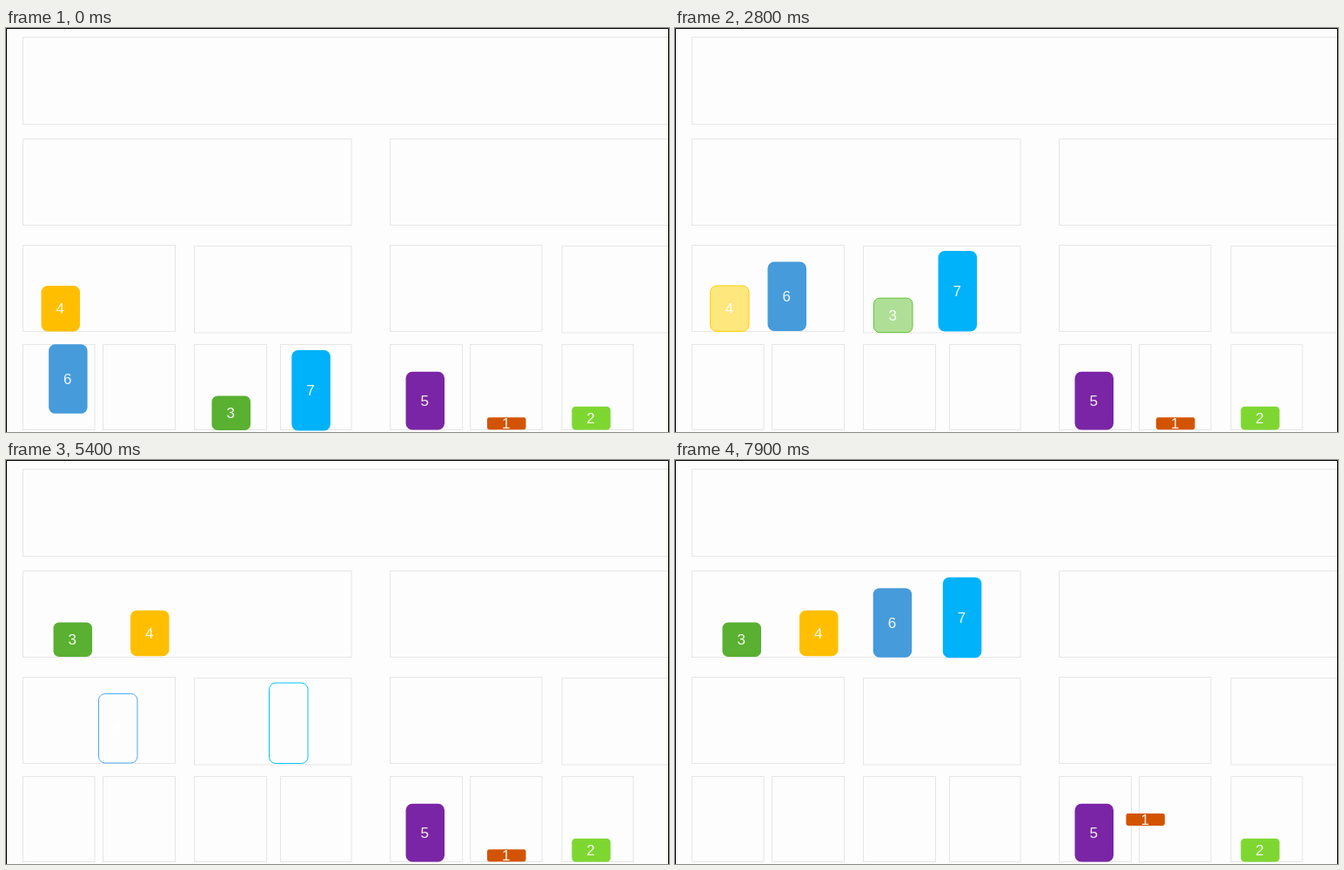
Recreate the animation shown at these times as an HTML page. Size 762 px wide and 464 px high, loop 8 s.

```html
<!DOCTYPE html>
<html lang="en">
<head>
<meta charset="utf-8">
<title>Merge sort</title>
<style>
  html, body { margin: 0; width: 100%; height: 100%; overflow: hidden; background: #fdfdfd; }
  svg { display: block; width: 762px; height: 464px; }
  text { font: 17px "Liberation Sans", Arial, sans-serif; fill: #fff; fill-opacity: .92; text-anchor: middle; }
</style>
</head>
<body>
<svg id="stage" viewBox="0 0 762 464">
  <rect width="762" height="464" fill="#fdfdfd"/>
  <g id="cells" fill="none" stroke="#e6e6e6"></g>
  <g id="blocks"></g>
  <path d="M.5 464V.5H761.5V464" fill="none" stroke="#000"/>
</svg>
<script>
const LOOP = 8000;
const MOVE = 935;
const FLASH = 415;
const WIDTH = 44.5;

const add = (parent, tag, attrs) => {
  const node = document.createElementNS("http://www.w3.org/2000/svg", tag);
  for (const key in attrs) node.setAttribute(key, attrs[key]);
  return parent.appendChild(node);
};
const clamp = v => Math.max(0, Math.min(1, v));
// constant acceleration, then constant deceleration
const ease = u => u < .5 ? 2 * u * u : 1 - 2 * (1 - u) ** 2;

// rows of cells: top, height, then left/right pairs
const rows = [
  [10.5, 100, [19.5, 800]],
  [127.5, 99, [19.5, 397], [441.5, 800]],
  [249.5, 99, [19.5, 194.5], [441.5, 616]],
  [250.5, 99.5, [216.5, 397], [639, 800]],
  [363.5, 98, [19.5, 102], [111.5, 194.5], [216.5, 299.5], [315.5, 397],
    [441.5, 524.5], [533.5, 616], [639, 721]]
];
const cells = document.getElementById("cells");
for (const [y, height, ...spans] of rows)
  for (const [x, right] of spans) add(cells, "rect", { x, y, width: right - x, height });

// moves: [start, x, y]; flashes: start times
const blocks = [
  { label: 4, color: "#ffbf00", x: 40.5, y: 296, h: 52.5,
    moves: [[4300, 143, 172.7]], flashes: [2535, 3885] },
  { label: 6, color: "#469bdb", x: 37.5, y: 382.5, h: 79.5,
    moves: [[-270, 106.5, 268.5], [5650, 227.7, 147.2]], flashes: [5235] },
  { label: 3, color: "#5ab031", x: 236.5, y: 422.5, h: 39.5,
    moves: [[665, 228.5, 310.2], [2950, 54.5, 186.5]], flashes: [2535] },
  { label: 7, color: "#00b2f9", x: 328.3, y: 370, h: 92.5,
    moves: [[1600, 302.5, 256], [6570, 307.8, 134.7]], flashes: [3885, 5235] },
  { label: 5, color: "#7a25a6", x: 459.5, y: 394.8, h: 66.7, moves: [], flashes: [] },
  { label: 1, color: "#d35400", x: 553, y: 447.2, h: 14, moves: [[7500, 459, 335]], flashes: [] },
  { label: 2, color: "#7ed731", x: 650.3, y: 434.8, h: 26.7, moves: [], flashes: [] }
];
const layer = document.getElementById("blocks");
for (const block of blocks) {
  const { color, label, h } = block;
  block.group = add(layer, "g", {});
  block.rect = add(block.group, "rect", {
    width: WIDTH, height: h, rx: Math.min(WIDTH, h) / 6, fill: color, stroke: color
  });
  add(block.group, "text", { x: WIDTH / 2 - .5, y: h / 2 + 6 }).textContent = label;
}

function position(block, time) {
  let { x, y } = block;
  for (const [start, toX, toY] of block.moves) {
    const p = ease(clamp((time - start) / MOVE));
    x += (toX - x) * p;
    y += (toY - y) * p;
  }
  return [x, y];
}

function render(time) {
  for (const block of blocks) {
    const [x, y] = position(block, time);
    block.group.setAttribute("transform", `translate(${x.toFixed(2)} ${y.toFixed(2)})`);

    const start = block.flashes.find(s => time >= s && time < s + FLASH);
    const k = start === undefined ? 0 : (time - start) / FLASH;
    const opacity = Math.max(clamp(1 - k / .38), clamp((k - .52) / .24));
    const glow = 1 + .1 * Math.min(1, 4 * k, 4 * (1 - k));
    block.rect.setAttribute("fill-opacity", opacity);
    block.rect.setAttribute("stroke-opacity", k ? 1 : 0);
    block.rect.style.filter = k ? `brightness(${glow})` : "none";
  }
}

const begin = performance.now();
function tick() {
  render((performance.now() - begin) % LOOP);
  requestAnimationFrame(tick);
}
render(0);
requestAnimationFrame(tick);
</script>
</body>
</html>
```
